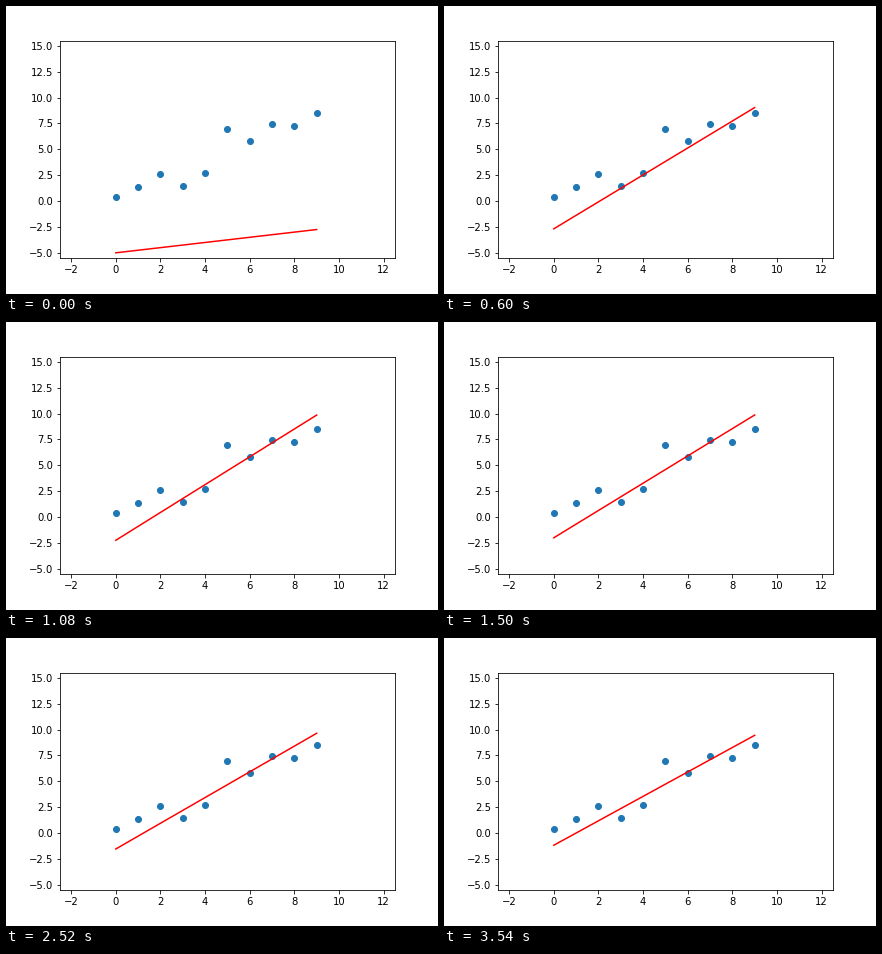
These frames come from a looping animation (432 px wide and 288 px high, 3.6 s). A matplotlib script:

```python
import numpy as np
import matplotlib.pyplot as plt
from matplotlib.animation import FuncAnimation

FRAMES = 60
INTERVAL = 60
SLOPE_RATE, BIAS_RATE = 0.006, 0.06

x = np.arange(10)
y = np.array([0.39, 1.36, 2.6, 1.45, 2.7, 6.96, 5.8, 7.44, 7.25, 8.5])


def descend(steps, slope=0.25, bias=-5.0):
    """Fit a line by gradient descent, keeping each step's parameters."""
    path = []
    for _ in range(steps):
        path.append((slope, bias))
        error = slope * x + bias - y
        slope -= SLOPE_RATE * np.mean(error * x)
        bias -= BIAS_RATE * np.mean(error)
    return path


path = descend(FRAMES)

plt.rcParams.update({"font.family": "DejaVu Sans", "font.size": 10})
fig, ax = plt.subplots(figsize=(6, 4), dpi=72)
fig.subplots_adjust(left=0.125, right=0.9, bottom=0.125, top=0.88)
ax.set_xlim(-2.5, 12.5)
ax.set_ylim(-5.5, 15.5)
ax.set_xticks(np.arange(-2, 13, 2))
ax.set_yticks(np.arange(-5, 15.1, 2.5))
ax.scatter(x, y)
line, = ax.plot(x, x, "r-", linewidth=1.5)


def update(frame):
    slope, bias = path[frame]
    line.set_ydata(slope * x + bias)
    return line,


anim = FuncAnimation(fig, update, frames=FRAMES, interval=INTERVAL,
                     repeat=True, repeat_delay=0)
plt.show()
```
